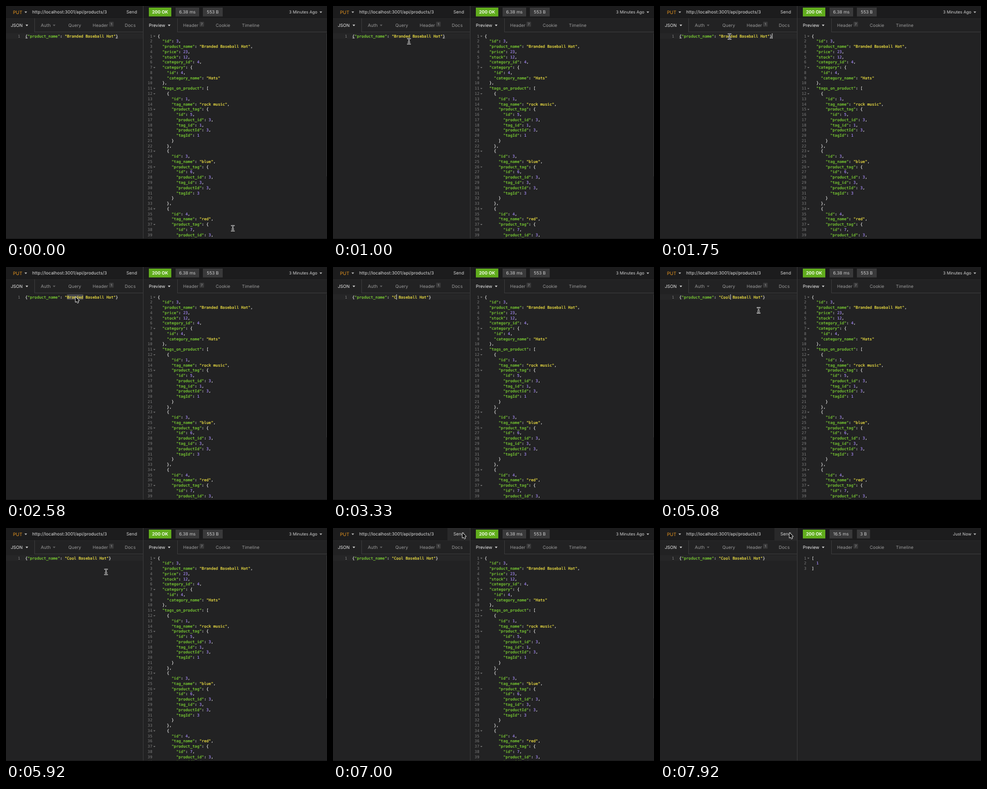
Animation of 600x435 px, one loop 8 s. Source, as an HTML page with a canvas:

```html
<!DOCTYPE html>
<html lang="en">
<head>
<meta charset="utf-8">
<title>API client</title>
<style>
  html, body { margin: 0; width: 100%; height: 100%; overflow: hidden; background: #222223; }
  canvas { display: block; width: 600px; height: 435px; }
</style>
</head>
<body>
<canvas id="stage"></canvas>
<script>
const W = 600, H = 435, LOOP = 8000;
const canvas = document.getElementById('stage');
const ctx = canvas.getContext('2d');
const dpr = window.devicePixelRatio || 1;
canvas.width = W * dpr;
canvas.height = H * dpr;

const SANS = 'Inter, Roboto, sans-serif';
const MONO = '"DejaVu Sans Mono", monospace';
const CODE_SIZE = 7.2, CHAR = CODE_SIZE * 0.602, ROW = 9.765, FIRST_ROW = 56;
const GREEN = '#82dc35', YELLOW = '#fbec45', PURPLE = '#a58af5', PLAIN = '#e4e4e4';
const DIM = '#999', LINE = '#3b3b3c';

const SENT = 7350;                        // response arrives
const SELECTED = 1900;                    // word double-clicked
const KEYS = [3300, 3500, 3700, 3950];    // one per typed letter
const LAST_KEY = KEYS[KEYS.length - 1];

const tag = (id, name, link) => ({
  id, tag_name: name,
  product_tag: { id: link, product_id: 3, tag_id: id, productId: 3, tagId: id }
});
const toLines = value => JSON.stringify(value, null, 2).split('\n');
const productLines = toLines({
  id: 3, product_name: 'Branded Baseball Hat', price: 23, stock: 12, category_id: 4,
  category: { id: 4, category_name: 'Hats' },
  tags_on_product: [tag(1, 'rock music', 5), tag(3, 'blue', 6), tag(4, 'red', 7)]
});
const resultLines = toLines([1]);

// Pointer stops: time, x, y
const path = [
  [0, 424, 415], [200, 424, 415], [920, 142, 66], [1100, 142, 66], [1600, 130, 57],
  [4300, 130, 57], [5200, 187, 82], [5950, 187, 82], [6650, 242, 10], [LOOP, 242, 10]
];

function pointerAt(t) {
  const i = Math.max(1, path.findIndex(stop => stop[0] > t));
  const [t0, x0, y0] = path[i - 1], [t1, x1, y1] = path[i];
  const k = (t - t0) / (t1 - t0), ease = k * k * (3 - 2 * k);
  return { x: x0 + (x1 - x0) * ease, y: y0 + (y1 - y0) * ease };
}

function rect(x, y, w, h, color) {
  ctx.fillStyle = color;
  ctx.fillRect(x, y, w, h);
}

// Glyphs are laid out large and scaled down to keep fractional advances.
function text(str, x, y, size, color, { font = SANS, weight = 400, align = 'left', bolder = 0 } = {}) {
  ctx.save();
  ctx.translate(x, y);
  ctx.scale(0.1, 0.1);
  ctx.font = `${weight} ${size * 10}px ${font}`;
  ctx.textAlign = align;
  ctx.fillStyle = ctx.strokeStyle = color;
  ctx.fillText(str, 0, 0);
  if (bolder) {
    ctx.lineWidth = bolder * 10;
    ctx.lineJoin = 'round';
    ctx.strokeText(str, 0, 0);
  }
  ctx.restore();
}

function label(str, x, midY, color, size = 8.25, options) {
  text(str, x, midY + size * 0.363, size, color, options);
}

function triangle(x, y, color, w = 5, h = 3) {
  ctx.fillStyle = color;
  ctx.beginPath();
  ctx.moveTo(x - w / 2, y - h / 2);
  ctx.lineTo(x + w / 2, y - h / 2);
  ctx.lineTo(x, y + h / 2);
  ctx.fill();
}

function pill(str, x, w, color, textColor, weight = 400) {
  rect(x, 3, w, 16.5, color);
  label(str, x + w / 2, 11.5, textColor, 8.2, { align: 'center', weight });
}

function countBadge(str, x) {
  rect(x - 4.2, 29.5, 8.4, 9, '#3a3a3b');
  label(str, x, 34, '#aaa', 6, { align: 'center' });
}

function codeLine(line, x, midY) {
  const tokens = line.matchAll(/("[^"]*")(?=:)|("[^"]*"?)|(\d+)|[^\s"\d]+/g);
  for (const m of tokens) {
    const color = m[1] ? GREEN : m[2] ? YELLOW : m[3] ? PURPLE : PLAIN;
    text(m[0], x + m.index * CHAR, midY + 2.6, CODE_SIZE, color, { font: MONO, bolder: 0.18 });
  }
}

function lineNumber(n, x, midY) {
  text(n, x, midY + 2.6, CODE_SIZE, '#7c7c7c', { font: MONO, align: 'right' });
}

function drawFrame() {
  rect(0, 0, W, H, '#222223');
  rect(0, 0, W, 23, '#1c1c1d');
  rect(0, 23, W, 0.7, '#2b2b2c');
}

function drawRequest(t) {
  if (t >= 6520) rect(214, 0, 42, 23, '#29292a');
  label('PUT', 13, 11.5, '#e0911f', 8.7);
  triangle(37, 11.7, '#bbb');
  label('http://localhost:3001/api/products/3', 49, 11.5, '#dedede', 8.2);
  label('Send', 225, 11.5, '#d2d2d2', 8.2);

  label('JSON', 9, 36, '#eee', 8.1);
  triangle(39, 36.2, '#ddd');
  label('Auth', 65, 36, DIM, 8.4);
  triangle(90, 36.2, '#666');
  label('Query', 116.5, 36, DIM);
  label('Header', 162, 36, DIM);
  countBadge('1', 197);
  label('Docs', 222, 36, DIM, 8.4);
  rect(53, 23, 1, 26, LINE);
  rect(53, 48, 203, 1, LINE);

  const typed = KEYS.filter(key => t >= key).length;
  const selecting = t >= SELECTED && !typed;
  const word = typed ? 'Cool'.slice(0, typed) : 'Branded';
  const body = `{"product_name": "${word} Baseball Hat"}`;
  const left = 36, wordX = left + 18 * CHAR;

  if (selecting) rect(wordX, 51, 7 * CHAR, 10, '#48484d');
  else rect(0, 51, 256, 10, '#262627');
  lineNumber(1, 26.5, FIRST_ROW);
  codeLine(body, left, FIRST_ROW);

  if (t < SELECTED) {
    for (const column of [0, body.length - 1]) rect(left + column * CHAR, 59.6, CHAR, 0.6, PLAIN);
  }
  const blink = typed
    ? t < LAST_KEY || (t - LAST_KEY) % 1060 < 530
    : !selecting && (t + 800) % 1060 < 530;
  if (blink) {
    const column = typed ? 18 + typed : body.length;
    rect(left + column * CHAR, 51, 0.9, 10, '#eee');
  }
}

function drawResponse(t) {
  const done = t >= SENT;
  pill('200 OK', 267, 42, '#61ad1d', '#fff', 600);
  pill(done ? '16.5 ms' : '6.38 ms', 317, done ? 42.5 : 44, '#39393a', '#ccc');
  pill(done ? '3 B' : '553 B', 368, done ? 24.5 : 37, '#39393a', '#ccc');
  label(done ? 'Just Now' : '3 Minutes Ago', 582, 11.5, '#d2d2d2', 7.75, { align: 'right' });
  triangle(588.5, 11.7, '#bbb');

  label('Preview', 267, 36, '#eee', 8.2);
  triangle(305, 36.2, '#ddd');
  label('Header', 331, 36, DIM);
  countBadge('7', 366);
  label('Cookie', 392, 36, DIM, 8.2);
  label('Timeline', 441, 36, DIM, 8.2);
  rect(320, 23, 1, 26, LINE);
  rect(320, 48, W - 320, 1, LINE);

  (done ? resultLines : productLines).forEach((line, i) => {
    const y = FIRST_ROW + i * ROW;
    if (y > H + 5) return;
    lineNumber(i + 1, 273.5, y);
    if (/[{[]$/.test(line)) triangle(277.3, y + 0.6, '#777', 4, 2.2);
    codeLine(line, 283.5, y);
  });
  if (!done) rect(599, 51, 1, 267, '#343435');
}

function strokeTwice(points, outer, inner) {
  ctx.beginPath();
  points.forEach(([x, y, start]) => start ? ctx.moveTo(x, y) : ctx.lineTo(x, y));
  ctx.lineCap = 'round';
  for (const [width, color] of [[outer, '#eee'], [inner, '#111']]) {
    ctx.lineWidth = width;
    ctx.strokeStyle = color;
    ctx.stroke();
  }
}

function drawPointer(t) {
  if (t >= KEYS[0] && t < 4300) return;
  const { x, y } = pointerAt(t);
  const arrow = (t >= SELECTED && t < KEYS[0]) || t >= 6380;
  ctx.save();
  if (arrow) {
    ctx.translate(x, y - 1);
    ctx.beginPath();
    for (const [px, py] of [[0, 0], [0, 9.4], [2.1, 7.5], [3.7, 11], [5.3, 10.3], [3.8, 6.9], [6.7, 6.7]])
      ctx.lineTo(px, py);
    ctx.closePath();
    ctx.lineJoin = 'round';
    ctx.lineWidth = 1.6;
    ctx.strokeStyle = '#f2f2f2';
    ctx.stroke();
    ctx.fillStyle = '#080808';
    ctx.fill();
  } else {
    ctx.translate(x, y);
    strokeTwice([
      [-2.4, -5, true], [-0.8, -4.8], [0, -4], [0.8, -4.8], [2.4, -5],
      [0, -4, true], [0, 4],
      [-2.4, 5, true], [-0.8, 4.8], [0, 4], [0.8, 4.8], [2.4, 5],
      [-1.2, 1.7, true], [1.2, 1.7]
    ], 2.2, 0.8);
  }
  ctx.restore();
}

function render(now) {
  const t = now % LOOP;
  ctx.setTransform(dpr, 0, 0, dpr, 0, 0);
  ctx.textRendering = 'geometricPrecision';
  drawFrame();
  drawRequest(t);
  drawResponse(t);
  rect(256, 0, 1, H, LINE);
  rect(0, 434, W, 1, '#171718');
  drawPointer(t);
}

const started = performance.now();
(function tick() {
  render(performance.now() - started);
  requestAnimationFrame(tick);
})();
</script>
</body>
</html>
```
